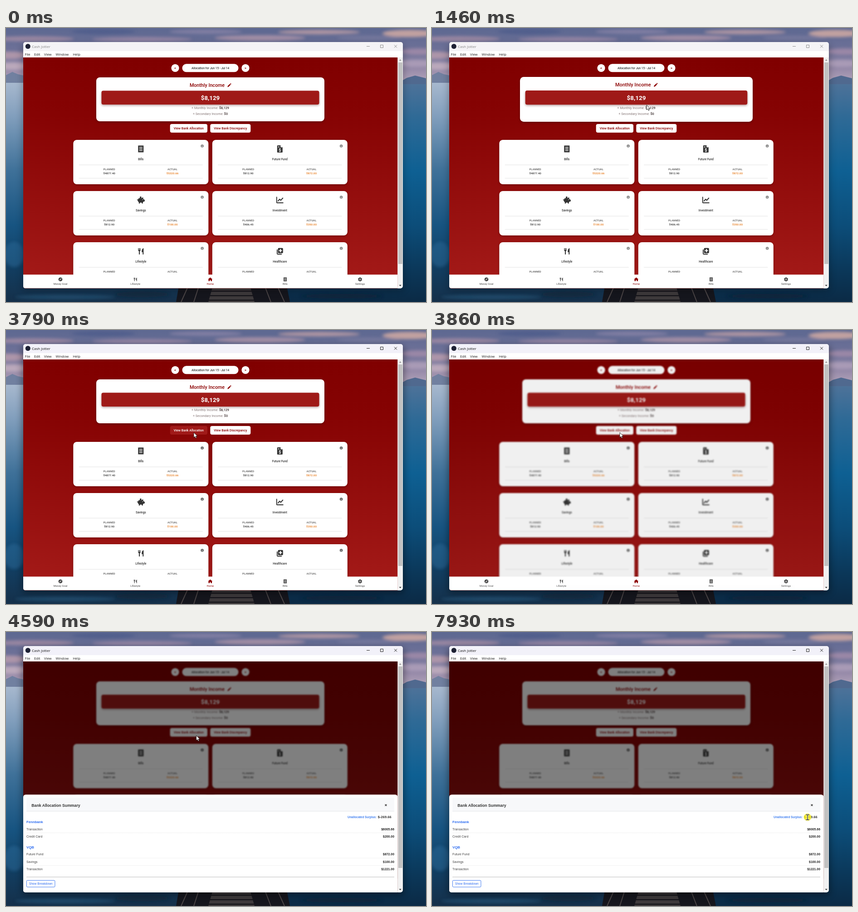
An HTML page that plays this animation: 926x605 px, repeating every 7.99 s.

```html
<!DOCTYPE html>
<html lang="en">
<head>
<meta charset="utf-8">
<title>Budget overview</title>
<style>
  html, body { margin: 0; width: 100%; height: 100%; overflow: hidden; background: #16395a; }
  svg { display: block; width: 926px; height: 605px; }
  text { font-family: Roboto, sans-serif; white-space: pre; }
  .ui text { font-family: "Open Sans", sans-serif; }
  .sheet text { font-family: "Liberation Sans", Arial, sans-serif; }
</style>
</head>
<body>
<svg id="stage" viewBox="0 0 926 605"></svg>
<script>
const LOOP = 7990;
const RED = '#8b0000', BLUE = '#2c6cf0', INK = '#333';

// ---------- markup helpers ----------
const rect = (x, y, w, h, fill, r = 0, extra = '') =>
  `<rect x="${x}" y="${y}" width="${w}" height="${h}" rx="${r}" fill="${fill}" ${extra}/>`;
const circle = (x, y, r, fill, extra = '') => `<circle cx="${x}" cy="${y}" r="${r}" fill="${fill}" ${extra}/>`;
const path = (d, fill, extra = '') => `<path d="${d}" fill="${fill}" ${extra}/>`;
const stroke = (d, color, width = 1, extra = '') =>
  `<path d="${d}" fill="none" stroke="${color}" stroke-width="${width}" ${extra}/>`;
const text = (s, x, y, size, fill = INK, weight = 400, anchor = 'start', extra = '') =>
  `<text x="${x}" y="${y}" font-size="${size}" fill="${fill}" font-weight="${weight}" text-anchor="${anchor}" ${extra}>${s}</text>`;
const mid = (s, x, y, size, fill, weight, extra) => text(s, x, y, size, fill, weight, 'middle', extra);
const at = (x, y, body, scale = 1) => `<g transform="translate(${x} ${y}) scale(${scale})">${body}</g>`;
const group = (id, body, extra = '') => `<g id="${id}" ${extra}>${body}</g>`;
const gradient = (id, stops, vertical = 1) =>
  `<linearGradient id="${id}" x2="${1 - vertical}" y2="${vertical}">` +
  stops.map(([o, c, a = 1]) => `<stop offset="${o}" stop-color="${c}" stop-opacity="${a}"/>`).join('') +
  '</linearGradient>';
const blur = (id, sd) =>
  `<filter id="${id}" x="-30%" y="-30%" width="160%" height="160%"><feGaussianBlur stdDeviation="${sd}"/></filter>`;

// ---------- icons, centred on 0,0 ----------
const fork = 'M-6-7v4.5q0 2 1.7 2.3v7.2h2v-7.2q1.7-.3 1.7-2.3v-4.5h-1v4h-1v-4h-1.4v4h-1v-4z';
const knife = 'M6-7q-4 1.5-4 7v2h2v5h2z';
const icons = {
  receipt: c => path('M-6-8l1.5 1 1.5-1 1.5 1 1.5-1 1.5 1 1.5-1 1.5 1 1.5-1v16l-1.5-1-1.5 1-1.5-1-1.5 1-1.5-1-1.5 1-1.5-1-1.5 1z', c) +
    stroke('M-3.5-3.5h7M-3.5 0h7M-3.5 3.5h7', '#fff', 1.4),
  invoice: c => path('M-4.5-8h6l4.5 4.5v10q0 1.5-1.5 1.5h-9q-1.5 0-1.5-1.5v-13q0-1.5 1.5-1.5z', c) +
    path('M1.5-8v4.5h4.5z', '#fff') + stroke('M-4-5.5h3M-4-3.5h3', '#fff', .9) +
    mid('$', 0, 5.6, 9, '#fff', 700),
  piggy: c => path('M-3-4.5h5l3-2v3q1.5 1 2 2.500h1.500v4h-2l-2 2v2.500h-2.500v-2h-4v2h-2.500v-3q-2.500-1.500-2.500-4q-1.500 0-1.500-2.300h1q0 1 .8 1q.7-3 3.700-3.700z', c) +
    circle(-.5, -6, 2, c) + circle(4, -1, .8, '#fff'),
  chart: c => stroke('M-7-6.500v11.500q0 1 1 1h13', c, 1.9, 'stroke-linecap="round"') +
    stroke('M-4 2l3.500-4 2.500 2.500 4.500-5', c, 1.9, 'stroke-linecap="round" stroke-linejoin="round"'),
  utensils: c => path(fork, c) + path(knife, c),
  medical: c => stroke('M-6-3v7.500q0 2 2 2h7.500', c, 1.8, 'stroke-linecap="round"') +
    rect(-4.3, -7.3, 11.3, 11.600, c, 2) + stroke('M1.3-5v7M-2.200-1.500h7', '#fff', 2.2),
  compass: c => circle(0, 0, 7.500, c) + path('M4-4l-2.500 5.500-5.500 2.500 2.500-5.500z', '#fff') + circle(0, 0, 1.2, c),
  home: c => path('M0-7.500l8.500 7.500h-2v7h-4.500v-4.500h-4v4.500h-4.500v-7h-2z', c),
  gear: c => stroke('M0-8v16M-6.900-4l13.800 8M-6.900 4l13.800-8', c, 3.8) + circle(0, 0, 5.800, c) + circle(0, 0, 2.300, '#fff'),
  pencil: c => path('M-4 4l.6-2.700 4.900-4.900 2.100 2.100-4.900 4.900zM2.100-4.200l.7-.6q.7-.5 1.300.1l.7.7q.5.600 0 1.200l-.6.6z', c),
};

// ---------- desktop photo in soft tones ----------
const ellipse = (x, y, rx, ry, fill, o) =>
  `<ellipse cx="${x}" cy="${y}" rx="${rx}" ry="${ry}" fill="${fill}" opacity="${o}"/>`;
const desktop = () =>
  rect(0, 0, 926, 125, 'url(#sky)') +
  `<g filter="url(#soft)">` +
  [[60, 24, 90, 6, '#a98fa6'], [215, 8, 70, 6, '#4d5d8b'], [300, 25, 110, 5, '#a28ca8'], [440, 8, 80, 5, '#8d86a8'],
   [560, 22, 100, 6, '#b79aab'], [690, 9, 90, 5, '#c9a4a8'], [800, 22, 70, 5, '#7a7b9f'], [890, 12, 60, 8, '#e0b3a6'],
   [8, 60, 38, 8, '#bf9fae'], [15, 84, 40, 8, '#c9b4c2'], [910, 52, 40, 7, '#a98fab'], [905, 78, 40, 8, '#b3a2bd']]
    .map(c => ellipse(...c, .75)).join('') + '</g>' +
  path('M0 104l14-7 12 5 14 3v18h-40z', '#7180a0') +
  path('M870 118l14-8 18-5 24 6v16h-56z', '#50698f') +
  rect(0, 121, 470, 484, 'url(#lakeLeft)') + rect(470, 124, 456, 481, 'url(#lakeRight)') +
  `<g filter="url(#soft)">` + ellipse(130, 594, 110, 5, '#2b5b80', .55) + ellipse(300, 588, 60, 7, '#0e2337', .6) +
  ellipse(740, 592, 90, 6, '#0a2138', .7) + ellipse(18, 500, 22, 28, '#2a6b98', .5) + '</g>' +
  path('M381 570h238l7 35h-251z', '#15161d') +
  path('M456 570h82l10 35h-102z', '#3e3a3c') +
  stroke('M452 581h92M449 591h98M446 601h104', '#15141a', 2.5) +
  stroke('M400 574l-14 31M424 574l-10 31M572 574l12 31M600 574l14 31', '#4b4546', 2);

// ---------- window frame ----------
const chrome = () =>
  rect(38, 31, 837, 544, '#fff', 5) +
  group('titlebar', '<path d="M38 51v-15q0-5 5-5h827q5 0 5 5v15z"/>') +
  circle(48.300, 40.500, 5.500, '#1d2033') +
  group('caption', text('Cash Jotter', 57, 43.800, 8, 'currentColor') +
    stroke('M795 40.500h7M825.500 37.500h6v6h-6zM856 37.500l6 6M862 37.500l-6 6', 'currentColor', .9)) +
  [['File', 41.500], ['Edit', 62], ['View', 84], ['Window', 109.500], ['Help', 147.500]]
    .map(([s, x]) => text(s, x, 60.600, 7.600, '#1b1b1b')).join('') +
  rect(863.500, 65, 11.500, 505, '#f1f1f1') + rect(865, 76, 9, 445, '#c1c1c1') +
  path('M866.700 72.300l2.500-3 2.500 3z', '#8a8a8a') + path('M866.700 567.300l2.500 3 2.500-3z', '#333');

// ---------- page ----------
const pageButton = (id, label, x, w) =>
  group(id, rect(x, 212, w, 19, 'var(--bg, #fff)', 4) +
    mid(label, x + w / 2, 224.200, 7, 'var(--fg, #8b0000)', 500));

const incomeCard = () => {
  const line = (label, value, y) =>
    mid(`${label}: <tspan fill="#3a2c2c" font-weight="500">${value}</tspan>`, 450.500, y, 7.200, '#857575');
  return group('income',
    rect(199, 111, 503, 97, '#300', 8, 'opacity=".45" filter="url(#shade)"') + rect(199, 109, 503, 97, '#fff', 8) +
    mid('Monthly Income', 443.500, 130, 10.700, RED, 500) + at(492, 126.700, icons.pencil(RED), .92) +
    rect(210.500, 141, 480, 30, '#400', 4, 'opacity=".4" filter="url(#shade)"') +
    rect(210.500, 138.500, 480, 30.500, '#9f1a18', 4) + mid('$8,129', 450.500, 158.800, 13.300, '#fff', 700) +
    line('+ Monthly Income', '$8,129', 179) + line('+ Secondary Income', '$0', 191.500));
};

const card = (col, row, icon, label, planned, actual) => at(148.300 + col * 306.500, 247 + row * 113,
  rect(0, 1.500, 298, 98, '#300', 8, 'opacity=".4" filter="url(#shade)"') + rect(0, 0, 298, 98, '#fff', 8) +
  at(149, 20, icons[icon]('#333')) + mid(label, 149, 44.700, 6.400, INK, 500) +
  stroke('M12.500 55.300h273M12.500 84.700h273', '#ddd', .8) +
  mid('PLANNED', 79.300, 67.200, 5.800, '#555', 500) + mid(planned, 79.300, 76.300, 6.200, INK, 500) +
  mid('ACTUAL', 218.700, 67.200, 5.800, '#555', 500) + mid(actual, 218.700, 76.300, 6.200, '#e67817', 500) +
  `<g class="info">${circle(284.300, 13.600, 3.300, 'currentColor')}</g>` + mid('i', 284.300, 15.600, 5.500, '#fff', 700));

const page = () =>
  [[373, '&lt;'], [528, '&gt;']].map(([x, s]) => circle(x, 88.300, 8.600, '#fff') + mid(s, x, 90.700, 7.500, RED, 700)).join('') +
  rect(388.500, 79.300, 124, 18, '#fff', 9) + mid('Allocation for Jun 15 - Jul 14', 450.500, 90.700, 6.450, INK, 500) +
  incomeCard() +
  pageButton('allocation', 'View Bank Allocation', 361.700, 82.300) +
  pageButton('discrepancy', 'View Bank Discrepancy', 450.300, 89) +
  card(0, 0, 'receipt', 'Bills', '$4877.40', '$5320.66') +
  card(1, 0, 'invoice', 'Future Fund', '$812.90', '$872.00') +
  card(0, 1, 'piggy', 'Savings', '$812.90', '$100.00') +
  card(1, 1, 'chart', 'Investment', '$406.45', '$350.00') +
  card(0, 2, 'utensils', 'Lifestyle', '', '') +
  card(1, 2, 'medical', 'Healthcare', '', '');

const tabBar = () => rect(38, 544.500, 825.500, 30, '#fff') +
  ['compass Money Goal', 'utensils Lifestyle', 'home Home', 'receipt Bills', 'gear Settings'].map((entry, i) => {
    const [icon, ...label] = entry.split(' '), x = 120 + i * 165.150, color = i === 2 ? RED : '#444';
    return at(x, 555, icons[icon](color), .58) + mid(label.join(' '), x, 567, 5.800, color);
  }).join('');

// ---------- bottom sheet ----------
const sheet = () => {
  const row = (label, amount, y) => text(label, 45, y, 6.900, '#444') + text(amount, 856, y, 6.900, '#222', 700, 'end');
  return path('M38 575v-210q0-6 6-6h813.500q6 0 6 6v210z', '#fff') +
    rect(45, 365.500, 811, 30.500, '#f7f8fa') + stroke('M45 395.800h811', '#dfe2e6', .8) +
    text('Bank Allocation Summary', 56.300, 386, 8.700, INK, 700) +
    stroke('M835.600 380.400l3.800 3.800M839.400 380.400l-3.800 3.800', '#222', 1.2) +
    text('Unallocated Surplus:', 817, 411, 6.400, '#3f7ff0', 700, 'end') + text('$-269.66', 849.800, 411, 7.600, INK, 700, 'end') +
    text('Fennbank', 45, 421.700, 7.750, BLUE, 700) +
    row('Transaction', '$6005.66', 438) + row('Credit Card', '$200.00', 454) +
    text('VQB', 45, 477.500, 7.750, BLUE, 700) +
    row('Future Fund', '$872.00', 493) + row('Savings', '$100.00', 509.600) + row('Transaction', '$1221.00', 526) +
    stroke('M45 443.500h811M45 499.200h811M45 515.500h811', '#ddd', .8, 'stroke-dasharray="1 1"') +
    stroke('M45 541h811', '#bbb', 1) +
    rect(45.400, 548.400, 62.500, 14.700, '#fff', 2, `stroke="${BLUE}" stroke-width=".9"`) +
    mid('Show Breakdown', 76.700, 558.200, 6.700, BLUE);
};

const beam = 'M-3.500-5.500h2.500l1 .7 1-.7h2.500M-3.500 5.500h2.500l1-.7 1 .7h2.500M0-5v10';
const pointer = () =>
  group('glow', circle(0, 0, 8.200, '#f2ea1c', 'opacity=".85"')) +
  group('arrow', path('M0 0v10.800l2.500-2.300 1.700 3.800 1.900-.8-1.700-3.700h3.500z', '#fff', 'stroke="#111" stroke-width=".8" stroke-linejoin="round"')) +
  group('beam', stroke(beam, '#fff', 2.600) + stroke(beam, '#222', 1.3));

document.getElementById('stage').innerHTML =
  '<defs>' +
  gradient('sky', [[0, '#5d6891'], [.4, '#6e7198'], [.75, '#9a8dab'], [1, '#b8a9bd']]) +
  gradient('lakeLeft', [[0, '#a7b8ce'], [.15, '#829fbd'], [.4, '#3f7199'], [.65, '#175481'], [.85, '#123d60'], [1, '#15304a']]) +
  gradient('lakeRight', [[0, '#4d7299'], [.15, '#2f6a96'], [.4, '#0e6093'], [.65, '#0c4d79'], [.85, '#0b385a'], [1, '#0b2a45']]) +
  gradient('wall', [[0, '#800000'], [.25, '#860303'], [1, '#a51b19']]) +
  blur('soft', 3) + blur('shade', 2.500) + blur('drop', 8) +
  '<clipPath id="view"><rect x="38" y="65" width="825.5" height="510"/></clipPath>' +
  '<clipPath id="frame"><rect x="38" y="31" width="837" height="544" rx="5"/></clipPath></defs>' +
  desktop() + group('dropShadow', rect(36, 36, 841, 544, '#000', 6, 'filter="url(#drop)"')) +
  '<g clip-path="url(#frame)">' + `<g class="ui">${chrome()}</g>` +
  '<g clip-path="url(#view)">' + rect(38, 65, 825.500, 510, 'url(#wall)') +
  group('page', page()) + group('dim', rect(38, 65, 825.500, 510, '#000')) + tabBar() +
  group('sheet', sheet(), 'class="sheet"') + '</g></g>' + group('pointer', pointer());

// ---------- motion ----------
const el = Object.fromEntries([...document.querySelectorAll('svg [id]')].map(n => [n.id, n]));
const clamp = v => Math.max(0, Math.min(1, v));
const ramp = (t, start, length) => clamp((t - start) / length);
const show = (node, on) => node.setAttribute('visibility', on ? 'visible' : 'hidden');

const FOCUS = 3700, OPEN = 3850;
const route = [
  [120, 930, 612], [860, 745, 436], [1300, 486, 188], [1460, 473, 170], [2620, 473, 170], [3280, 414, 226.500],
  [4420, 414, 226.500], [4590, 419, 228.500], [5330, 825, 429], [5870, 843, 454], [6400, 843, 454],
  [6930, 838, 412], [7130, 838, 412], [7530, 825, 409], [7730, 825, 409], [7930, 828, 409]];

function pointerAt(t) {
  const i = route.findIndex(p => p[0] > t);
  if (i < 1) return (i ? route.at(-1) : route[0]).slice(1);
  const [a, b] = [route[i - 1], route[i]];
  const k = (t - a[0]) / (b[0] - a[0]);
  return [1, 2].map(n => a[n] + (b[n] - a[n]) * k);
}

function draw(t) {
  const focused = t >= FOCUS, open = t >= OPEN;
  el.titlebar.setAttribute('fill', focused ? '#f2f1f9' : '#f4f3f6');
  el.caption.style.color = focused ? '#111' : '#858585';
  el.dropShadow.setAttribute('opacity', focused ? .42 : .25);
  document.querySelectorAll('.info').forEach(n => n.style.color = t > 2590 ? '#666' : '#8a8a8a');

  const grow = 1 + .02 * (ramp(t, 1280, 150) - ramp(t, 2980, 150));
  el.income.setAttribute('transform', `translate(450.5 157.5) scale(${grow}) translate(-450.5 -157.5)`);

  const hover = t >= 3120 && !open;
  el.allocation.style.setProperty('--bg', hover ? '#a01a19' : '#fff');
  el.allocation.style.setProperty('--fg', hover ? '#fff' : RED);

  const rise = ramp(t, OPEN, 280), left = (1 - rise) ** 2.300;
  el.page.style.filter = open ? 'blur(1.5px)' : 'none';
  el.dim.setAttribute('opacity', .5 * clamp(rise * 3));
  el.sheet.setAttribute('transform', `translate(0 ${216 * left})`);
  el.sheet.setAttribute('opacity', open ? 1 - left : 0);

  const typing = t >= 5400;
  el.pointer.setAttribute('transform', `translate(${pointerAt(t)})`);
  show(el.arrow, !typing);
  show(el.beam, typing);
  show(el.glow, t >= 7730);
}

function tick() {
  draw(performance.now() % LOOP);
  requestAnimationFrame(tick);
}
tick();
</script>
</body>
</html>
```
